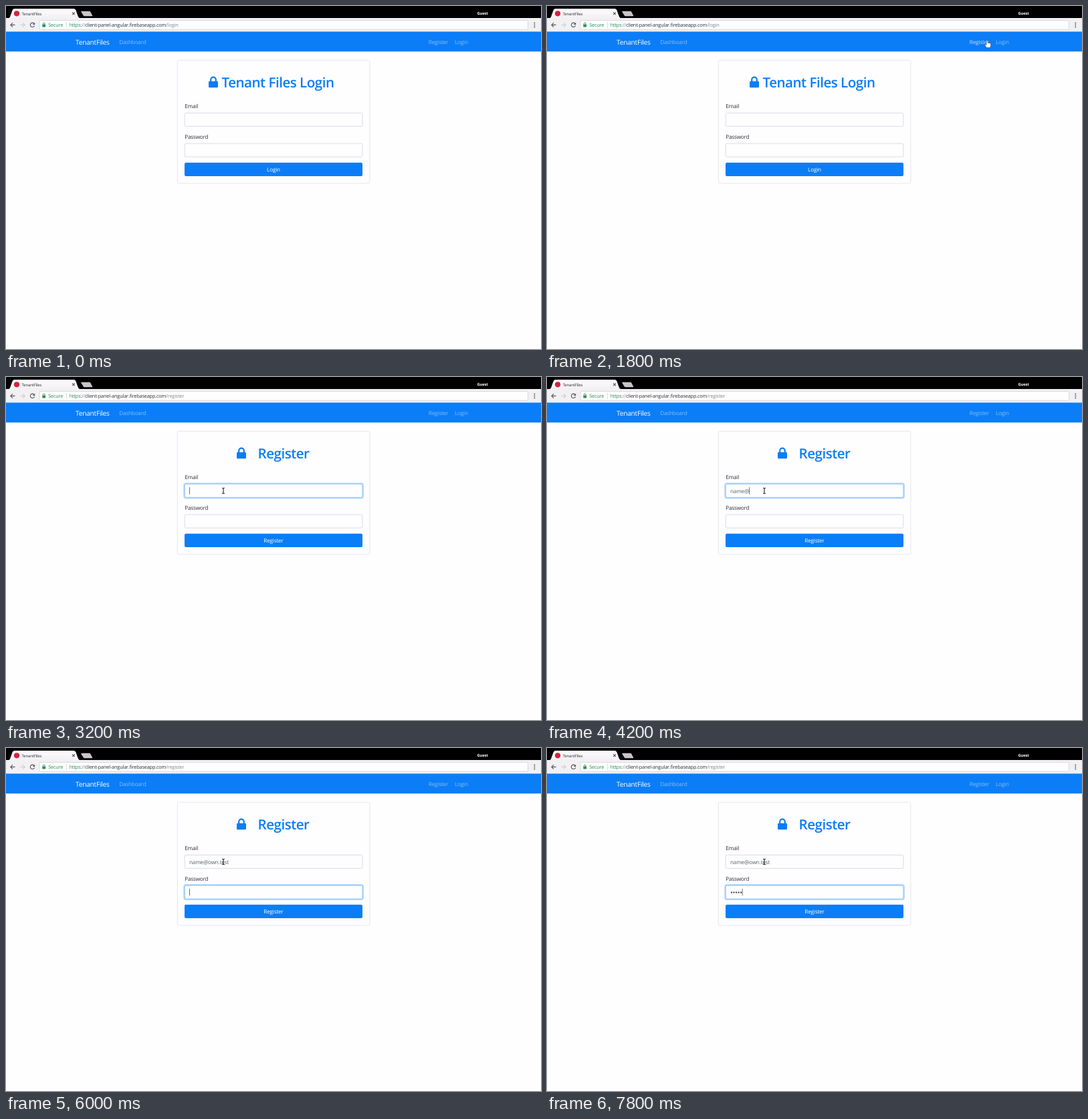
An HTML page that plays this animation: 800 by 514 pixels, repeating every 8000 ms.

```html
<!DOCTYPE html>
<html lang="en">
<head>
<meta charset="utf-8">
<title>TenantFiles</title>
<style>
  html, body { margin: 0; width: 100%; height: 100%; overflow: hidden; background: #fefdff; }
  svg { display: block; width: 100vw; height: 100vh; }
  text { font: 8.2px "Open Sans", "Noto Sans", sans-serif; letter-spacing: -.025em;
         fill: #2b3035; text-rendering: geometricPrecision; white-space: pre; }
  .blue { fill: #0b7df6; }
  .tab { font-size: 6px; }
  .guest { font-size: 5.8px; font-weight: 700; fill: #fff; }
  .url, .url tspan { font-size: 7.35px; }
  .green { fill: #2c8f4e; }
  .grey { fill: #85858a; }
  .brand { font-size: 10.2px; fill: #fff; }
  .nav { fill: #fff; fill-opacity: .5; }
  .title { font-size: 20.6px; font-weight: 600; fill: #0b7df6; }
  .mid { text-anchor: middle; fill: #fff; }
  .value { fill: #5a6067; }
  .field { fill: #fff; fill-opacity: .6; stroke: #cfd5e0; stroke-width: .8; }
  .ring { fill: none; stroke: #0b7df6; stroke-opacity: .3; stroke-width: 1.8; }
  .focus .field { stroke: #7db9fb; }
  .line { fill: none; stroke: #55565a; stroke-width: 1.1; }
</style>
</head>
<body>
<svg viewBox="0 0 800 514" preserveAspectRatio="none">
  <defs>
    <linearGradient id="tabFill" x2="0" y2="1">
      <stop stop-color="#fdfbfd"/><stop offset="1" stop-color="#f2f0f3"/>
    </linearGradient>
    <g id="padlock">
      <rect y="7.2" width="14" height="9.6" rx="1.3" class="blue"/>
      <path d="M3.2 8V5a3.8 3.8 0 0 1 7.6 0v3" fill="none" stroke="#0b7df6" stroke-width="2.2"/>
    </g>
  </defs>

  <rect width="800" height="514" fill="#fefdff"/>

  <!-- browser frame -->
  <rect width="800" height="19" fill="#000"/>
  <rect y="18" width="800" height="20.5" fill="#f2f0f3"/>
  <path d="M3 18.5C6 18 6 16 7 13.5L9.5 6.5Q10.3 4 12.5 4H101.5Q103.7 4 104.5 6.5L107 13.5C108 16 108.500 18 111.500 18.500Z" fill="url(#tabFill)"/>
  <path d="M113 7.700H124.500Q125.800 7.700 126.400 9L129.200 14.200Q129.600 15.300 128.300 15.300H117.500Q116.200 15.300 115.600 14L112.300 8.800Q112 7.700 113 7.700Z" fill="#c8c4c7"/>
  <circle cx="16" cy="11.300" r="4.100" fill="#d3243f"/>
  <text class="tab" x="23.500" y="13.500">TenantFiles</text>
  <path class="line" d="M99.200 9.500l3.600 3.600m0-3.600l-3.600 3.600" stroke-width=".8"/>
  <text class="guest" x="704.500" y="12.500">Guest</text>

  <path class="line" d="M13.500 28.400H7M10 25.200L6.800 28.400L10 31.600"/>
  <path class="line" d="M21.500 28.400H28M25 25.200L28.200 28.400L25 31.600" style="stroke:#cfcdd1"/>
  <path class="line" d="M42 26.300A3.200 3.200 0 1 0 42.600 29.300"/>
  <path d="M43.200 24.700V28.100H39.800Z" fill="#55565a"/>
  <rect x="50" y="21.500" width="730.500" height="13.700" rx="1.500" fill="#fefdff" stroke="#d3d1d5" stroke-width=".8"/>
  <rect x="54.300" y="27.400" width="4.800" height="4" rx=".5" class="green"/>
  <path d="M55.300 27.800V26.500a1.400 1.400 0 0 1 2.800 0V27.800" fill="none" stroke="#2c8f4e" stroke-width=".9"/>
  <text class="url green" x="63.200" y="31">Secure</text>
  <path d="M90.500 24V33" stroke="#d3d1d5" stroke-width=".8"/>
  <text class="url" x="94.700" y="31"><tspan class="green">https</tspan><tspan class="grey">://</tspan>client-panel-angular.firebaseapp.com<tspan class="grey" id="path"></tspan></text>
  <g fill="#55565a"><circle cx="790.300" cy="25.500" r=".95"/><circle cx="790.300" cy="28.500" r=".95"/><circle cx="790.300" cy="31.500" r=".95"/></g>

  <!-- navigation -->
  <rect y="38.400" width="800" height="29.800" class="blue"/>
  <text class="brand" x="104" y="57.500">TenantFiles</text>
  <text class="nav" x="169.200" y="57">Dashboard</text>
  <text class="nav" x="631.800" y="57" id="registerLink">Register</text>
  <text class="nav" x="671" y="57">Login</text>

  <!-- form -->
  <rect x="256.300" y="81.300" width="287.600" height="184.600" rx="2.200" fill="none" stroke="#e1e0e5" stroke-width=".8"/>
  <g id="loginTitle">
    <use href="#padlock" x="303" y="105.500"/>
    <text class="title" x="322.500" y="122">Tenant Files Login</text>
  </g>
  <g id="registerTitle">
    <use href="#padlock" x="345" y="105.500"/>
    <text class="title" x="376.500" y="122">Register</text>
  </g>
  <text x="267.200" y="153">Email</text>
  <g id="email">
    <rect class="ring" x="266.200" y="159.300" width="267.800" height="22.200" rx="3"/>
    <rect class="field" x="267.300" y="160.400" width="265.600" height="20" rx="2"/>
    <text class="value" x="274" y="173.700" id="emailText"></text>
  </g>
  <text x="267.200" y="199">Password</text>
  <g id="password">
    <rect class="ring" x="266.200" y="205" width="267.800" height="22.200" rx="3"/>
    <rect class="field" x="267.300" y="206.100" width="265.600" height="20" rx="2"/>
    <path id="dots" fill="none" stroke="#3f454b" stroke-width="2.300" stroke-linecap="round"/>
  </g>
  <rect id="caret" width=".7" height="10.500" fill="#33373b"/>
  <rect x="267" y="234.700" width="266" height="20.300" rx="2" class="blue"/>
  <text class="mid" x="400" y="248.200" id="button"></text>

  <!-- pointer shapes, hot spot at 0,0 -->
  <g id="pointer">
    <path id="arrow" d="M0 0V9.300L2.200 7.400L3.700 10.700L5 10.100L3.600 6.900H6.500Z" fill="#fff" stroke="#66676b" stroke-width=".7"/>
    <path id="hand" d="M-1 .8Q0-.6 1 .8V4.300Q2 3.600 2.600 4.500Q3.600 4 4.200 4.900Q5.700 4.600 5.700 6.200V8.500L4.700 11.500H-.5L-3.200 7.800Q-3.500 6.500-2.200 6.500L-1 7.500Z" fill="#fff" stroke="#44464a" stroke-width=".7"/>
    <path id="beam" d="M-2-4.200Q0-4.200 0-3V3Q0 4.200-2 4.200M2-4.200Q0-4.200 0-3M0 3Q0 4.200 2 4.200" fill="none" stroke="#222" stroke-width="1.100"/>
  </g>
</svg>
<script>
  const LOOP = 8000, STEP = 200;
  const ADDRESS = "name@own.test";
  const PAGE_SWITCH = 2200, EMAIL_FOCUS = 3200, PASSWORD_FOCUS = 5800;

  // [time, value...]
  const moves = [[1200, 540, 180], [1600, 658, 51], [2200, 658, 51], [2600, 316, 185], [3000, 325, 170.5]];
  const typed = [[3400, 0], [4200, 5], [5600, 13]];
  const hidden = [[6200, 0], [7000, 3], [7800, 5]];

  const $ = id => document.getElementById(id);
  const show = (node, on) => node.setAttribute("display", on ? "inline" : "none");
  const ease = p => p * p * (3 - 2 * p);

  function sample(keys, t, curve = p => p) {
    const next = keys.findIndex(k => k[0] > t);
    if (next === 0) return keys[0].slice(1);
    if (next < 0) return keys[keys.length - 1].slice(1);
    const a = keys[next - 1], b = keys[next];
    const p = curve((t - a[0]) / (b[0] - a[0]));
    return a.slice(1).map((v, i) => v + (b[i + 1] - v) * p);
  }

  function setFocus(id, on) {
    $(id).classList.toggle("focus", on);
    show($(id).querySelector(".ring"), on);
  }

  function drawPointer(t) {
    const [x, y] = sample(moves, t, ease);
    const kind = t >= 1600 && t <= PAGE_SWITCH ? "hand" : t >= 2800 ? "beam" : "arrow";
    show($("pointer"), t >= moves[0][0]);
    $("pointer").setAttribute("transform", `translate(${x} ${y})`);
    for (const id of ["arrow", "hand", "beam"]) show($(id), id === kind);
  }

  function drawPage(t) {
    const register = t >= PAGE_SWITCH;
    $("path").textContent = register ? "/register" : "/login";
    $("button").textContent = register ? "Register" : "Login";
    show($("loginTitle"), !register);
    show($("registerTitle"), register);
    const lit = t < 1600 || t >= EMAIL_FOCUS ? .5 : register ? .88 : .75;
    $("registerLink").style.fillOpacity = lit;
  }

  function drawFields(t) {
    const inPassword = t >= PASSWORD_FOCUS;
    const inEmail = t >= EMAIL_FOCUS && !inPassword;
    const count = Math.floor(sample(hidden, t)[0] + .001);
    setFocus("email", inEmail);
    setFocus("password", inPassword);

    $("emailText").textContent = ADDRESS.slice(0, Math.floor(sample(typed, t)[0] + .001));
    $("dots").setAttribute("d", Array.from({ length: count }, (_, i) => `M${276 + 3.55 * i} 216.500h.01`).join(""));

    const width = inPassword ? 3.55 * count : $("emailText").getComputedTextLength();
    $("caret").setAttribute("x", 274 + width);
    $("caret").setAttribute("y", inPassword ? 210.8 : 165.2);
    show($("caret"), inEmail || inPassword);
  }

  const start = performance.now();
  function frame() {
    const elapsed = (performance.now() - start) % LOOP;
    const t = Math.floor(elapsed / STEP) * STEP;
    drawPage(t);
    drawFields(t);
    drawPointer(t);
    requestAnimationFrame(frame);
  }
  frame();
</script>
</body>
</html>
```
